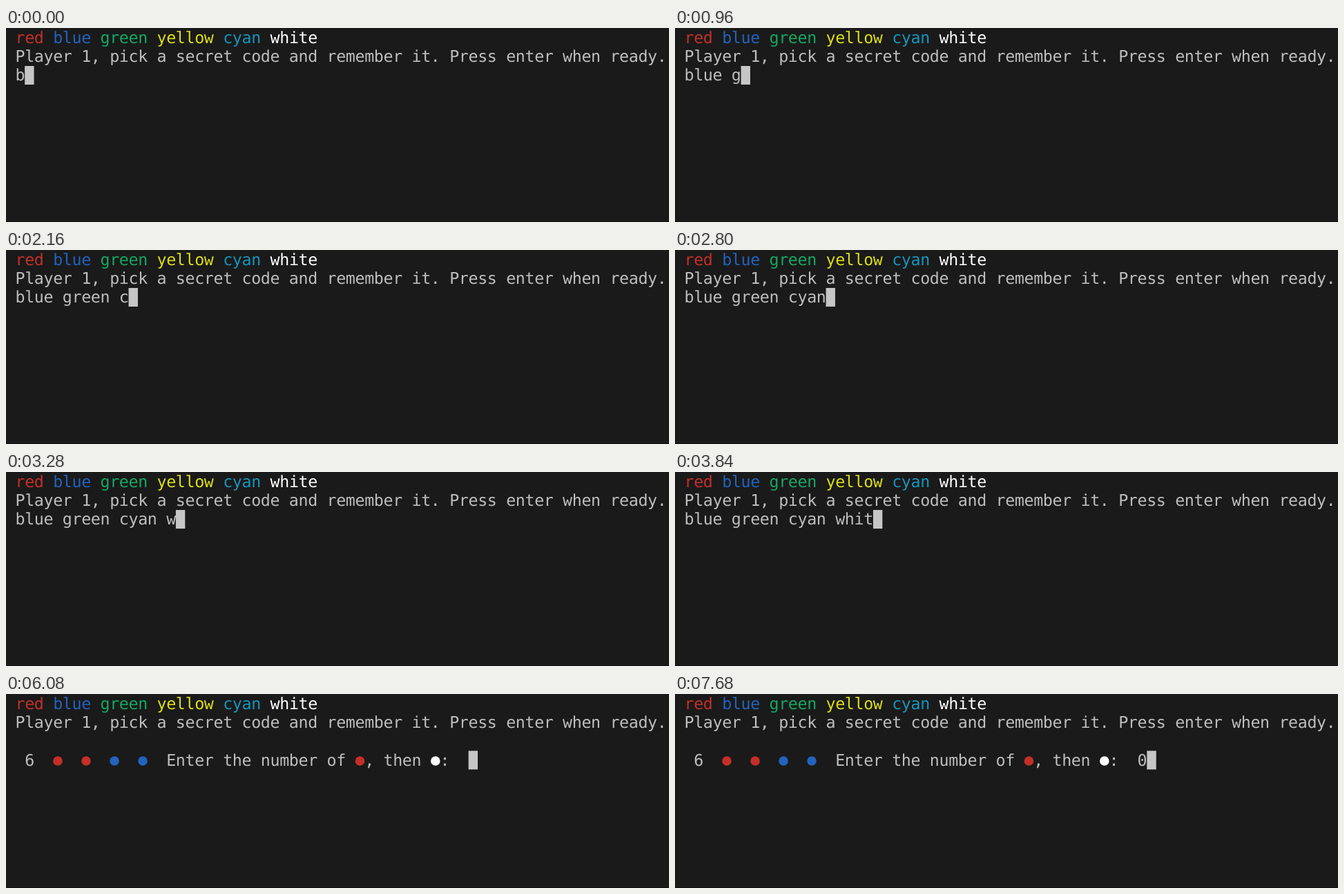
These frames come from a looping animation (960 px wide and 281 px high, 8 s). An HTML page:

```html
<!DOCTYPE html>
<html lang="en">
<head>
<meta charset="utf-8">
<title>Code guessing game in a terminal</title>
<style>
html, body { margin: 0; width: 100%; height: 100%; overflow: hidden; background: #1a1a1a; }
svg { display: block; }
text { font: 23.3px "DejaVu Sans Mono", monospace; letter-spacing: -0.36px; white-space: pre; fill: #bebebe; text-rendering: geometricPrecision; }
.red { fill: #c42f28; }
.blue { fill: #2263be; }
.green { fill: #14a862; }
.yellow { fill: #dfdf14; }
.cyan { fill: #1695bb; }
.white { fill: #fff; }
</style>
</head>
<body>
<svg width="960" height="281" viewBox="0 0 960 281">
  <rect y="280" width="960" height="1" fill="#121212"/>
  <text x="13.5" y="21.5"><tspan class="red">red</tspan> <tspan class="blue">blue</tspan> <tspan class="green">green</tspan> <tspan class="yellow">yellow</tspan> <tspan class="cyan">cyan</tspan> <tspan class="white">white</tspan></text>
  <text x="13.5" y="48.9">Player 1, pick a secret code and remember it. Press enter when ready.</text>
  <text x="13.5" y="76.2" id="typed"></text>
  <g id="guess">
    <text x="13.5" y="103.6"> 6              Enter the number of  , then  :  <tspan id="answer"></tspan></text>
  </g>
  <rect id="cursor" width="13.4" height="27" fill="#c6c6c6"/>
</svg>
<script>
const CELL = 13.67, LEFT = 13.5, LOOP = 8000;
const CODE = "blue green cyan white";
// Time at which each character of CODE appears
const KEYS = [0, 240, 400, 480, 640, 960, 1120, 1360, 1520, 1600, 1760,
  2160, 2400, 2560, 2800, 2960, 3280, 3440, 3600, 3760, 4000];
const ENTER = 4880, PROMPT = 5280, ANSWER = 7360;
const $ = id => document.getElementById(id);
const columnX = column => LEFT + column * CELL;

function addDot(column, color) {
  const dot = document.createElementNS("http://www.w3.org/2000/svg", "circle");
  dot.setAttribute("cx", columnX(column + 0.5));
  dot.setAttribute("cy", 97);
  dot.setAttribute("r", 6.8);
  dot.setAttribute("class", color);
  $("guess").append(dot);
}
["red", "red", "blue", "blue"].forEach((color, i) => addDot(4 + 3 * i, color));
addDot(36, "red");
addDot(44, "white");

function draw(now) {
  const t = now % LOOP;
  const prompted = t >= PROMPT, answered = t >= ANSWER;
  const count = t < ENTER ? KEYS.filter(key => key <= t).length : 0;
  $("typed").textContent = CODE.slice(0, count);
  $("guess").style.display = prompted ? "" : "none";
  $("answer").textContent = answered ? "0" : "";
  $("cursor").setAttribute("x", columnX(prompted ? 48 + answered : count));
  $("cursor").setAttribute("y", prompted ? 82.3 : 55);
  requestAnimationFrame(() => draw(performance.now() - start));
}
const start = performance.now();
draw(0);
</script>
</body>
</html>
```
